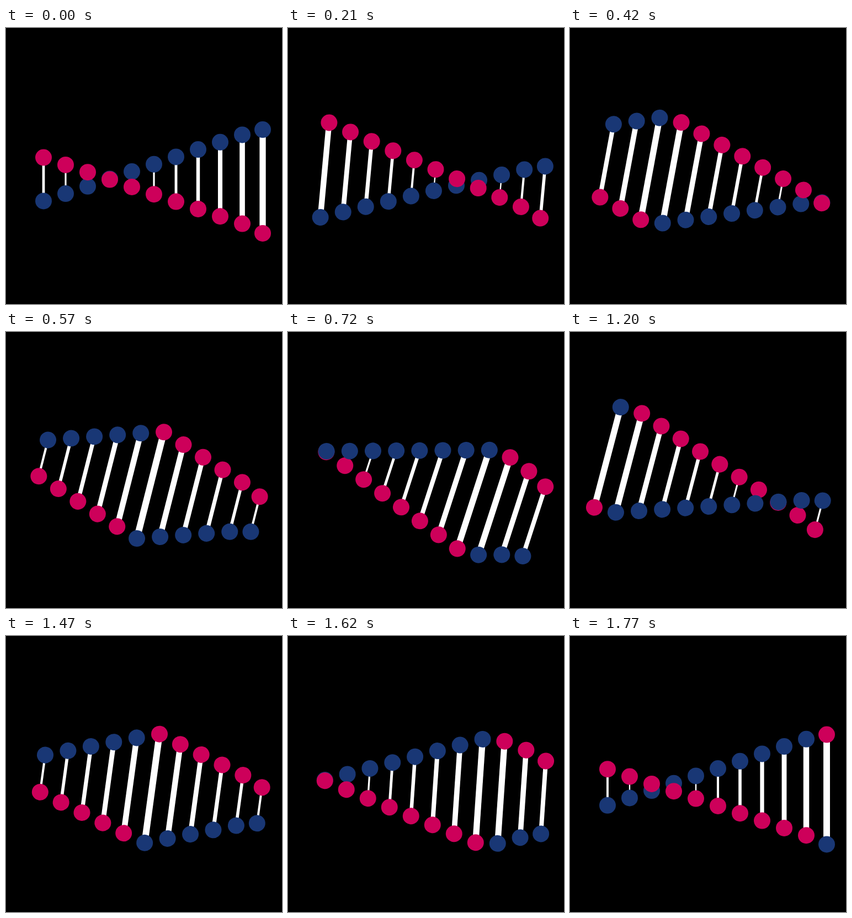
These frames come from a looping animation (500 by 500 pixels, 1.8 s). An HTML page with a canvas:

```html
<!DOCTYPE html>
<html lang="en">
<head>
<meta charset="utf-8">
<title>Turning helix</title>
<style>
  html, body { margin: 0; width: 100%; height: 100%; overflow: hidden; background: #000; }
  canvas { display: block; width: 500px; height: 500px; }
</style>
</head>
<body>
<canvas id="stage" width="500" height="500"></canvas>
<script>
const ctx = document.getElementById('stage').getContext('2d');
const PINK = '#cd005a', BLUE = '#193775';
const STEP = 30, STEPS = 60, PASS = 900, LAG = 2.5;
const RUNGS = 11, REACH = 100, PEAK = 22.5;

// Rises for 30 steps, then returns to level on the last step.
const tilt = step => PEAK * (step <= 30 ? step / 30 : (59 - step) / 29) * Math.PI / 180;

function dot(x, y, color) {
  ctx.fillStyle = color;
  ctx.beginPath();
  ctx.arc(x, y, 15, 0, 2 * Math.PI);
  ctx.fill();
}

function rung(i, time) {
  const last = i === RUNGS - 1;
  const x = 68 + 40 * i - (last ? 3 : 0);
  const y = last ? 278 : 274;
  const turns = (time + 630 - 60 * i - LAG) / PASS;
  const pass = Math.floor(turns);
  const rise = REACH * (1 - 2 * (turns - pass));
  const size = Math.abs(rise);
  const width = 0.12 * size;

  ctx.fillStyle = '#fff';
  ctx.fillRect(x - width / 2, y - size, width, 2 * size);

  // The beads trade colours at each end, so the front colour alternates.
  const dots = [[y - rise, BLUE], [y + rise, PINK]];
  if (pass % 2) dots.reverse();
  for (const [cy, color] of dots) dot(x, cy, color);
}

function draw() {
  const step = Math.floor((performance.now() + 0.5) / STEP) % STEPS;
  ctx.fillStyle = '#000';
  ctx.fillRect(0, 0, 500, 500);
  ctx.save();
  ctx.translate(250, 250);
  ctx.rotate(tilt(step));
  ctx.translate(-250, -250);
  for (let i = 0; i < RUNGS; i++) rung(i, step * STEP);
  ctx.restore();
  requestAnimationFrame(draw);
}
draw();
</script>
</body>
</html>
```
